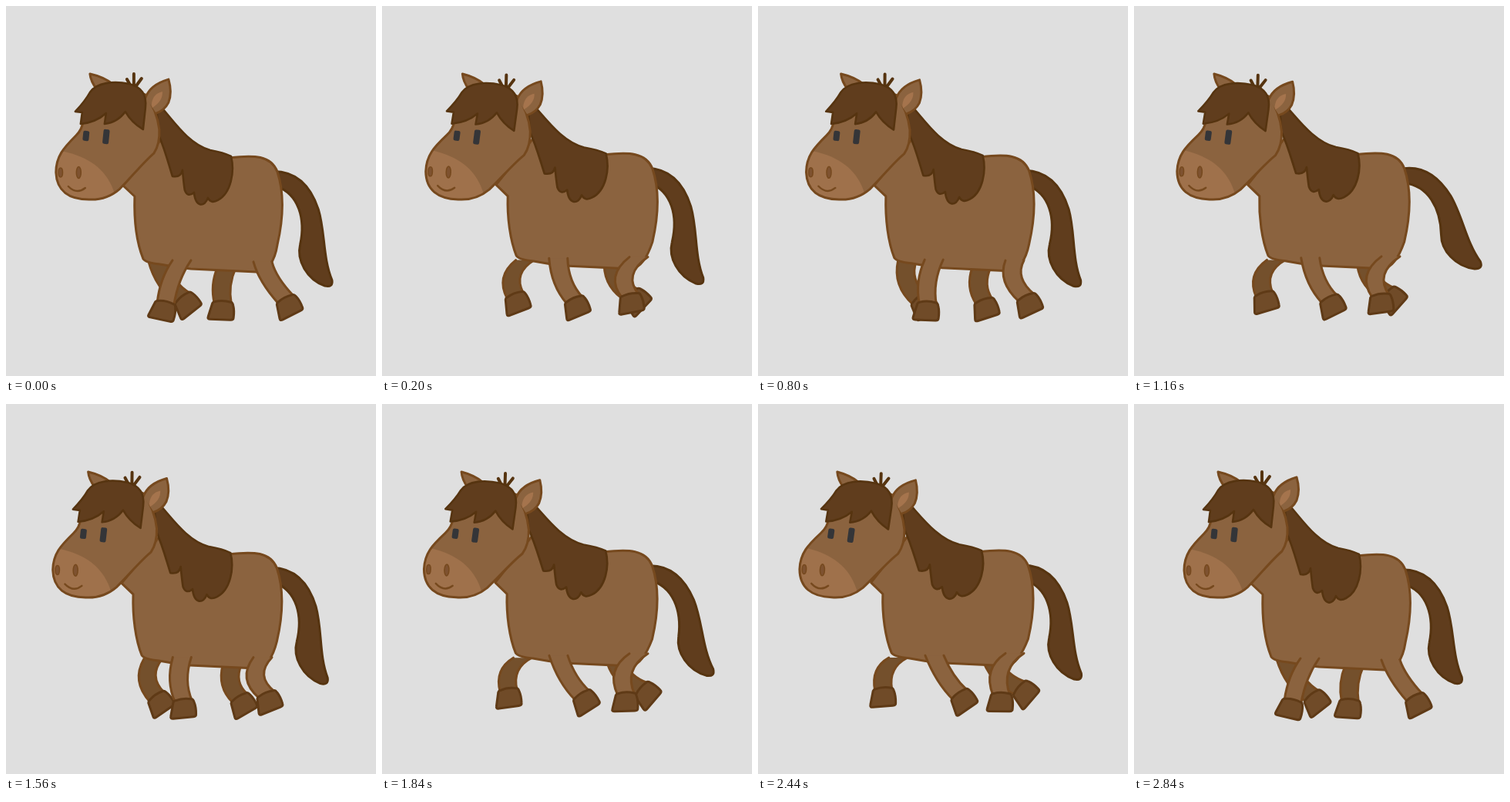
An HTML page with a canvas for the animation above (2.88 s loop, 480 px wide and 480 px high).

```html
<!DOCTYPE html>
<html lang="en">
<head>
<meta charset="utf-8">
<title>Walking horse</title>
<style>
html, body { margin: 0; width: 100%; height: 100%; overflow: hidden; background: #dfdfdf; }
canvas { display: block; width: 100vmin; height: 100vmin; }
</style>
</head>
<body>
<canvas id="stage" width="480" height="480"></canvas>
<script>
const ctx = document.getElementById('stage').getContext('2d');
const LOOP = 2880, STEP = 720, FRAME = 40;
const COAT = '#8b633f', EDGE = '#76491e', SHADE = '#74502c', HOOF = '#704b28',
      HAIR = '#603d1d', HAIR_EDGE = '#563410', MUZZLE = '#9f714b', EYE = '#343538';

// Hips slide along a line; knees, hooves and tilts sweep from start to end, pulled by the middle value.
const farFront = {
  fill: SHADE, hip: [[197, 331], [181, 329]],
  knee: [[207, 363], [149, 355], [158, 341]],
  hoof: [[237, 388], [181, 393], [160, 380]], tilt: [-38, -42, -1]
};
const farHind = {
  fill: SHADE, hip: [[286, 339], [306, 336]],
  knee: [[276, 362], [282, 368], [318, 357]],
  hoof: [[278, 396], [320, 392], [350, 375]], tilt: [4, -54, -49]
};
const nearFront = {
  fill: COAT, hip: [[228, 330], [229, 326]],
  knee: [[211, 354], [218, 366], [244, 357]],
  hoof: [[202, 396], [242, 399], [269, 385]], tilt: [13, -12, -37]
};
const nearHind = {
  fill: COAT, hip: [[333, 332], [333, 323]],
  knee: [[341, 355], [288, 358], [304, 342]],
  hoof: [[368, 391], [326, 384], [313, 388]], tilt: [-27, -25, 3]
};

const path = d => new Path2D(d);
const hoofShape = path('M-12-10Q-11-12-9-12Q1-15 12-12Q14-12 15-8Q17-1 16 8Q16 11 12 11L-14 11Q-18 11-17 8Z');
const tail = path('M-8-2C20-3 40 13 52 45C62 74 60 108 73 136Q75 146 64 144C40 136 26 112 30 92C36 58 26 26-4 17Z');
const mane = path('M196 138L203 133C218 150 238 180 265 187Q282 190 292 195C297 215 292 243 275 252Q266 257 262 249C258 261 246 262 244 242Q236 249 232 239Q231 234 229 213Q227 223 216 221C211 205 206 185 198 167Z');
const head = path('M100 150Q99 160 91 168C75 184 65 195 65 216C66 240 82 251 108 251Q131 252 148 237C163 222 178 203 192 191Q200 179 199 160Q196 135 181 115Q140 95 100 150Z');
const muzzle = path('M60 185L80 190C112 198 132 215 141 243L130 262L50 262Z');
const forelock = path('M90 137Q103 123 109 112C118 99 140 97 160 101Q184 107 181 132L178 160Q163 151 155 137Q145 151 128 153L130 139Q117 151 97 153L99 138Z');
const leftEar = path('M109 88Q127 92 138 101L118 108Q110 98 109 88Z');
const rightEar = path('M181 119Q187 102 211 95Q216 112 211 125Q206 135 195 139');
const innerEar = path('M189 128Q190 114 203 111Q204 123 190 132Z');
const tufts = path('M157 95L162 104M166 88L166 104M176 94L168 105');
const smile = path('M81 234Q92 245 103 236');

const radians = degrees => degrees * Math.PI / 180;
const mix = (a, b, s) => a + (b - a) * s;
const sweep = ([a, b, c], s) => mix(mix(a, b, s), mix(b, c, s), s);
const along = (rule, points, s) => [0, 1].map(axis => rule(points.map(p => p[axis]), s));

function paint(shape, fill, edge, width = 3) {
  if (fill) { ctx.fillStyle = fill; ctx.fill(shape); }
  if (edge) { ctx.strokeStyle = edge; ctx.lineWidth = width; ctx.stroke(shape); }
}

function within(draw) {
  ctx.save();
  draw();
  ctx.restore();
}

function drawLeg(leg, s) {
  const [hipX, hipY] = along(([a, b], k) => mix(a, b, k), leg.hip, s);
  const [kneeX, kneeY] = along(sweep, leg.knee, s);
  const [x, y] = along(sweep, leg.hoof, s);
  const tilt = radians(sweep(leg.tilt, s)), c = Math.cos(tilt), n = Math.sin(tilt);
  const hip = side => `${hipX + 12 * side} ${hipY}`;
  const knee = side => `${kneeX + 11.5 * side * Math.cos(tilt / 2)} ${kneeY + 11.5 * side * Math.sin(tilt / 2)}`;
  const ankle = side => {
    const u = 1.5 + 11 * side, v = -10;
    return `${x + u * c - v * n} ${y + u * n + v * c}`;
  };
  const left = `M${hip(-1)}Q${knee(-1)} ${ankle(-1)}`;
  const right = `Q${knee(1)} ${hip(1)}`;
  paint(path(`${left}L${ankle(1)}${right}Z`), leg.fill);
  paint(path(`${left}M${ankle(1)}${right}`), null, EDGE);
  within(() => {
    ctx.translate(x, y);
    ctx.rotate(tilt);
    paint(hoofShape, HOOF, '#5f3a16');
  });
}

function drawTail(t, s) {
  const swing = Math.cos((t - 490) / STEP * 2 * Math.PI);
  const lift = swing > 0 ? [3.2, 4.8, 1.8, 1.8][Math.floor(t / STEP)] : 1;
  within(() => {
    ctx.translate(355 - 5 * s, 217 - 6 * s);
    ctx.rotate(radians(0.9 - 2.8 * swing * lift));
    paint(tail, HAIR, HAIR_EDGE);
  });
}

function drawBody(s) {
  within(() => {
    ctx.translate(358 - 1.5 * s, -5.5 * s);
    ctx.scale(1 + 0.02 * s, 1);
    ctx.translate(-358, 0);
    paint(path(`M152 ${233 + 4 * s}L167 ${247 + 5 * s}C166 278 170 308 178 328
      Q181 333 200 335Q220 339 240 341L325 345Q${347 - 8 * s} 343 352 310
      C360 275 361 242 352 215C344 194 322 193 290 197L250 215L200 175Z`), COAT, EDGE);
  });
}

function drawMane(s) {
  within(() => {
    ctx.translate(293 - 2 * s, -5 * s);
    ctx.scale(1 + 0.07 * s, 1);
    ctx.translate(-293, 0);
    paint(mane, HAIR, HAIR_EDGE, 2.6);
  });
}

function drawNostril(x, rx, ry) {
  const shape = new Path2D();
  shape.ellipse(x, 216, rx, ry, 0, 0, 2 * Math.PI);
  paint(shape, '#7e5230', EDGE, 1.5);
}

function drawEye(x, y, height, open) {
  within(() => {
    ctx.translate(x, y);
    ctx.scale(1, open);
    ctx.rotate(0.1 * open);
    ctx.fillStyle = EYE;
    ctx.beginPath();
    ctx.roundRect(-4, -height / 2, 8, height, 2.2);
    ctx.fill();
  });
}

function drawHead(t, s) {
  const open = Math.min(1, Math.max(0.09, (Math.abs(t - 2080) - 20) / 80));
  within(() => {
    ctx.translate(110 - 9 * s, 150);
    ctx.rotate(0.04 * s);
    ctx.translate(-110, -150);
    paint(leftEar, COAT, EDGE);
    paint(head, COAT);
    within(() => {
      ctx.clip(head);
      paint(muzzle, MUZZLE);
    });
    paint(head, null, EDGE);
    paint(rightEar, COAT, EDGE);
    paint(innerEar, '#a5744d');
    paint(tufts, null, HAIR_EDGE, 4);
    paint(forelock, HAIR, HAIR_EDGE, 2.6);
    drawEye(104, 168.5, 13, open);
    drawEye(130, 169.5, 19, open);
    drawNostril(71, 2.7, 6);
    drawNostril(94.5, 3, 7.5);
    paint(smile, null, EDGE, 2.4);
  });
}

function draw(t) {
  const stride = (1 - Math.cos((t - 690) / STEP * 2 * Math.PI)) / 2;
  ctx.fillStyle = '#dfdfdf';
  ctx.fillRect(0, 0, 480, 480);
  drawTail(t, stride);
  drawLeg(farFront, stride);
  drawLeg(farHind, stride);
  drawBody(stride);
  drawMane(stride);
  drawLeg(nearFront, stride);
  drawLeg(nearHind, stride);
  drawHead(t, stride);
}

ctx.lineJoin = ctx.lineCap = 'round';
const start = performance.now();
function tick() {
  const elapsed = (performance.now() - start) % LOOP;
  draw(Math.floor(elapsed / FRAME) * FRAME);
  requestAnimationFrame(tick);
}
tick();
</script>
</body>
</html>
```
